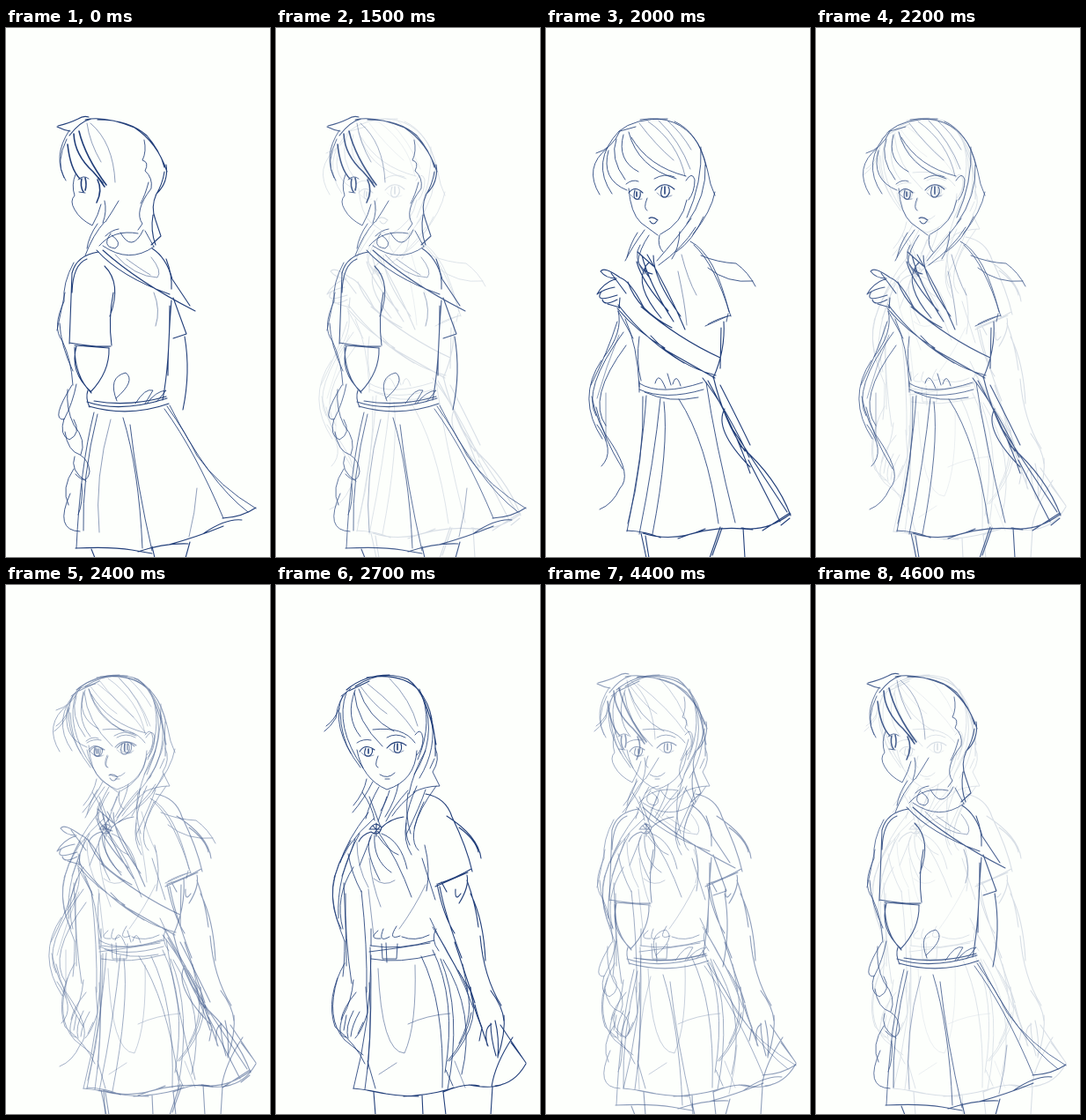
An HTML page that plays this animation: 300x600 px, repeating every 4.7 s.

```html
<!DOCTYPE html>
<html lang="en">
<head>
<meta charset="utf-8">
<title>Turning girl sketch</title>
<style>
html, body { margin: 0; width: 100%; height: 100%; overflow: hidden; background: #fdfffc; }
svg { display: block; width: 300px; height: 600px; fill: none; stroke: #223f7a; stroke-linecap: round; stroke-linejoin: round; }
.fine { stroke-width: .5; }
.pen { stroke-width: .85; }
.firm { stroke-width: 1.1; }
.bold { stroke-width: 1.6; }
.pose { animation: 4700ms linear infinite; }
#back { animation-name: back; }
#side { animation-name: side; opacity: 0; }
#front { animation-name: front; opacity: 0; }
/* every cross-fade passes through five mixes, 1/6 to 5/6 */
@keyframes back {
  0% { opacity: 1; }
  31.9148% { opacity: 1; animation-timing-function: steps(5, jump-both); }
  42.5531% { opacity: 0; }
  89.3617% { opacity: 0; animation-timing-function: steps(5, jump-both); }
  100% { opacity: 1; }
}
@keyframes side {
  0% { opacity: 0; }
  31.9148% { opacity: 0; animation-timing-function: steps(5, jump-both); }
  42.5531% { opacity: 1; }
  46.8085% { opacity: 1; animation-timing-function: steps(5, jump-both); }
  57.4468% { opacity: 0; }
  100% { opacity: 0; }
}
@keyframes front {
  0% { opacity: 0; }
  46.8085% { opacity: 0; animation-timing-function: steps(5, jump-both); }
  57.4468% { opacity: 1; }
  89.3617% { opacity: 1; animation-timing-function: steps(5, jump-both); }
  100% { opacity: 0; }
}
</style>
</head>
<body>
<svg viewBox="0 0 300 600">
<g id="back" class="pose">
  <!-- hair -->
  <path class="firm" d="M58,112Q66,116 73,117M59,111Q72,108 82,103Q88,99 94,101M97,103Q84,106 72,122M90,104Q112,99 146,113Q172,130 183,163M104,104Q140,104 160,122Q175,139 180,158"/>
  <path class="firm" d="M182,155Q185,175 171,188Q164,203 170,218L176,236L165,246M180,163Q178,177 170,190M167,212Q164,230 170,246"/>
  <path class="pen" d="M72,116Q52,146 68,173M69,126Q56,152 66,170M157,127Q160,140 155,150Q163,152 158,162Q167,170 165,182Q145,208 155,222L150,229M162,175Q158,190 153,199M112,196Q115,208 110,221M128,196Q121,208 113,220"/>
  <path class="bold" d="M77,120Q78,144 99,163L110,176M83,117Q90,146 114,178M70,132Q73,160 84,171"/>
  <path class="fine" d="M96,108Q122,130 124,175M92,108Q95,130 108,152"/>
  <!-- face -->
  <path class="pen" d="M79,166Q74,178 78,190Q72,196 78,206Q84,217 98,224Q105,212 108,200M82,172Q88,166 94,171M83,186L90,187"/>
  <path class="bold" d="M86,171Q84,180 88,186M90,170Q92,178 90,184M104,172Q110,184 103,198M105,170L112,180"/>
  <!-- neck and collar -->
  <path class="pen" d="M112,220Q99,234 90,258M104,222Q94,236 92,250M113,236Q120,229 128,228M106,247Q122,228 150,233M119,233Q108,248 124,250Q133,244 120,235M110,247Q140,268 168,248M130,232Q143,256 156,229M158,230L168,248"/>
  <path class="firm" d="M103,252Q130,282 186,302M110,252Q150,288 215,321M166,250Q182,260 189,285L209,315"/>
  <path class="fine" d="M124,257Q146,282 172,283Q178,276 165,260M137,262Q152,273 164,280M168,300Q176,320 170,338"/>
  <!-- sleeve and arm -->
  <path class="firm" d="M105,254Q80,258 75,278L72,358M92,262Q76,268 75,300M72,357Q98,362 119,361M78,360L117,363M122,300Q116,330 120,360M112,270Q132,290 118,327"/>
  <path class="firm" d="M80,361Q72,390 96,412M78,362Q78,395 97,414M117,363Q118,390 96,413"/>
  <!-- braid -->
  <path class="pen" d="M77,266Q64,290 66,310Q52,340 64,355Q74,375 76,405M61,335Q62,360 76,389M67,300L58,343M75,405Q50,445 66,444Q76,425 80,404M66,443Q60,462 72,467Q86,460 77,444"/>
  <path class="pen" d="M70,410Q68,432 77,450Q92,468 85,484M67,458Q70,480 84,484Q94,490 95,503Q92,520 79,506M78,486Q72,502 91,514M77,500Q62,522 71,541M86,517Q88,538 82,552M73,528Q54,570 84,571"/>
  <!-- body -->
  <path class="firm" d="M188,309Q184,360 184,394M186,315Q186,380 178,422M190,306L205,347L190,352M203,350Q210,390 201,433M182,262Q189,280 188,296"/>
  <path class="pen" d="M126,423Q115,396 136,391Q148,400 125,420M147,426Q158,408 167,411L158,426M160,426Q170,412 182,411L171,424"/>
  <path class="firm" d="M92,424Q130,437 183,420M94,429Q140,442 185,426M100,423Q140,430 182,418M93,411Q90,420 95,430"/>
  <!-- skirt and legs -->
  <path class="pen" d="M100,436Q84,500 80,590M104,438Q86,510 88,570M133,442Q151,500 155,590M141,450Q149,520 166,593M183,429Q206,462 217,485Q242,520 284,545M180,432Q215,480 247,556M186,428Q230,515 275,549"/>
  <path class="firm" d="M79,590Q120,588 143,592L166,596M150,594Q180,584 207,585M185,586Q215,578 247,565M225,573Q250,556 268,558M246,556Q268,555 284,544"/>
  <path class="fine" d="M119,444Q100,510 106,572M217,522Q215,550 208,577"/>
  <path class="firm" d="M97,591L101,601M166,588L169,601M209,583L204,601"/>
</g>

<g id="side" class="pose">
  <!-- hair -->
  <path class="pen" d="M83,117Q100,102 138,103M107,104Q150,97 172,130Q180,142 187,177L192,190M146,106Q173,118 182,157M192,186Q188,208 167,234M176,135Q178,175 160,215M181,155Q183,190 160,222"/>
  <path class="pen" d="M102,112L84,117Q75,137 57,142M70,136Q42,158 61,189M83,117Q50,152 75,188M71,139Q62,172 92,184M80,126Q72,148 90,172"/>
  <path class="pen" d="M88,121Q80,150 105,163M94,118Q104,158 148,171M97,124Q116,157 159,168"/>
  <path class="fine" d="M116,106Q150,130 158,168M128,105Q152,128 164,160M106,108Q124,132 145,150M139,106Q154,119 165,138"/>
  <!-- face -->
  <path class="pen" d="M94,182Q96,210 108,221L127,235M130,234Q155,222 160,195M159,173Q166,162 169,172Q169,186 162,195M115,193Q110,205 115,207M91,177Q98,171 105,174M123,171Q135,164 146,169"/>
  <path class="firm" d="M94,187Q101,178 110,187M124,184Q134,172 146,183M101,184Q98,196 105,194Q108,191 107,186M132,180Q128,193 136,192Q143,187 139,180M117,216Q121,213 127,218M118,219Q122,225 126,219"/>
  <path class="bold" d="M103,186V191M135,180V188"/>
  <path class="fine" d="M96,189Q101,196 109,194M126,187Q133,195 143,190"/>
  <!-- falling hair and collar -->
  <path class="pen" d="M129,235Q126,247 133,254M104,232Q96,244 92,260M112,229Q98,248 90,264M117,235Q106,251 104,267M165,216Q149,238 126,264M170,226Q155,250 128,269M179,214Q167,241 148,254M152,231Q151,250 143,262"/>
  <path class="pen" d="M164,242Q192,256 208,322M168,246Q192,268 210,327M176,258Q195,266 216,267Q230,277 238,293M184,272Q206,290 235,287M107,246Q98,259 112,279"/>
  <path class="firm" d="M103,265Q110,290 139,321M109,258Q117,290 145,333M115,257Q138,295 158,342M122,258Q122,285 153,327M113,271Q100,292 131,329M106,268L119,285M117,266Q106,276 121,279M104,254L122,270"/>
  <path class="fine" d="M154,257Q161,285 171,303M150,276Q158,312 160,337"/>
  <!-- raised hand and arm -->
  <path class="firm" d="M62,276Q66,270 84,283Q96,287 111,317M62,276Q68,284 80,284Q64,290 58,302Q66,296 78,294M63,299Q54,312 81,303M64,308Q66,316 81,308M70,313L84,317M74,278L91,301M84,306L83,318"/>
  <path class="firm" d="M81,318Q104,345 135,363M82,314Q115,356 157,380M119,349Q150,383 193,394M93,288Q104,320 143,340M108,316Q150,352 198,374M130,362L192,397M202,333Q204,366 190,397M199,340L198,386"/>
  <path class="pen" d="M210,326Q196,329 184,336M206,327L181,338M207,324L205,333"/>
  <!-- long hair -->
  <path class="pen" d="M82,321Q88,345 66,373M81,333Q70,368 51,405M88,345Q40,410 57,440M63,377Q34,420 64,466M91,360Q46,420 68,451M57,430Q64,463 87,500"/>
  <path class="pen" d="M52,418Q58,450 75,472Q98,508 84,522Q76,540 61,546M58,450Q80,480 63,497"/>
  <path class="fine" d="M83,348Q68,385 58,420M68,414V468"/>
  <!-- waist -->
  <path class="pen" d="M90,330Q104,360 106,407M82,321L99,352M106,350Q102,378 108,400M106,403Q130,418 178,402M106,410Q135,423 179,410M112,413Q140,426 173,419M106,401V413M136,409Q128,388 124,403M142,405L138,392M153,406Q148,390 144,404"/>
  <!-- skirt and legs -->
  <path class="pen" d="M114,417Q110,480 92,571M110,418Q112,490 93,562M130,420Q123,490 106,574M134,424Q140,475 121,574M151,421Q183,470 196,562M182,402Q192,470 215,561"/>
  <path class="firm" d="M178,397Q204,430 231,487M190,395Q202,446 226,480M184,400Q215,455 232,505M198,405Q220,448 232,473M203,432Q190,455 232,498M212,455Q235,490 274,549M221,474Q262,510 278,553M230,490L266,560"/>
  <path class="firm" d="M92,570Q114,571 130,578M110,573Q145,584 181,568M150,579Q190,563 235,569M222,567Q250,572 278,551M246,570L277,550M267,564L277,556"/>
  <path class="firm" d="M108,573L114,601M113,576L117,601M198,566L186,601M200,567L189,598M224,567L226,601"/>
</g>

<g id="front" class="pose">
  <!-- hair -->
  <path class="firm" d="M80,119Q100,102 129,102M90,115Q120,95 150,107Q172,122 182,181M103,105Q143,99 162,119Q174,134 177,152M176,150Q182,172 181,194M83,120L106,109"/>
  <path class="pen" d="M85,117Q70,128 68,151Q62,161 55,166M74,126L82,120M72,140Q66,154 57,160M76,125Q60,160 96,207M73,145Q74,172 85,191M80,122Q66,160 99,208M90,119Q78,150 96,172"/>
  <path class="pen" d="M89,122Q92,155 121,183M94,118Q104,150 134,166M110,164Q145,160 158,179"/>
  <path class="fine" d="M104,112Q140,140 158,167M129,106Q153,130 161,160M96,115Q111,136 126,146"/>
  <path class="pen" d="M163,118Q180,155 161,198M168,130Q183,175 157,215M176,148Q184,185 163,219M181,185Q187,198 178,212L186,228Q170,228 156,235M180,197L175,208M170,188Q156,212 151,237"/>
  <!-- face -->
  <path class="pen" d="M92,187Q98,220 126,232Q158,222 160,188M158,170Q165,160 167,174Q167,186 160,193M116,194Q111,206 116,207M118,215Q127,221 135,213M124,220H129M92,179Q99,174 108,176M126,173Q136,167 147,173"/>
  <path class="firm" d="M95,189Q101,179 112,187M126,185Q136,173 148,182M102,185Q98,195 106,194Q111,191 109,185M135,180Q132,192 140,190Q144,187 142,180"/>
  <path class="bold" d="M105,186V191M138,180V187"/>
  <path class="fine" d="M97,190Q102,197 111,193M129,186Q136,194 145,188"/>
  <!-- neck, collar, knot -->
  <path class="pen" d="M129,233Q125,247 119,256M139,226Q136,244 124,263M126,240L116,268M103,220Q100,236 88,250M110,223Q100,243 87,258M117,229Q106,248 102,265M98,235Q110,252 112,267M106,240L118,272M150,233Q134,250 125,268M158,235Q140,249 132,262"/>
  <path class="firm" d="M107,276Q113,267 120,275Q117,286 108,280M110,273L118,282M111,282L119,273M106,277H118M114,270V285M120,275Q130,265 145,263M108,280Q98,283 94,291"/>
  <path class="pen" d="M109,283Q98,297 118,335M112,284Q110,312 131,326M118,283Q138,310 154,354M120,282Q142,290 149,322M116,285Q128,302 139,306M108,286L95,318"/>
  <!-- shoulder and sleeve -->
  <path class="firm" d="M170,237Q193,241 200,263Q217,298 223,325M194,262Q230,285 233,310M208,275Q227,289 230,303M222,322Q205,332 184,339M218,326L181,342M204,345Q203,360 210,350M217,329Q220,342 208,361M188,337L194,348"/>
  <path class="pen" d="M150,236Q146,260 153,282M170,232Q164,250 148,283M160,228Q140,272 152,295M182,228Q162,255 157,276M148,270Q144,290 154,306M168,246Q148,288 162,301M169,295Q176,322 171,347M166,310L181,357"/>
  <!-- left hair -->
  <path class="pen" d="M105,258Q80,290 73,315M111,265Q76,295 66,332M85,290Q50,345 74,390M67,330Q58,355 78,404M90,288Q82,312 75,330M95,282Q68,330 71,378M88,320Q66,354 76,390"/>
  <path class="pen" d="M78,404Q78,428 76,444M78,429Q56,468 67,501Q92,522 101,543M70,446Q56,492 78,516L99,533"/>
  <path class="fine" d="M92,292Q92,320 105,343M106,310Q109,340 119,365M111,333Q123,343 135,335M105,345L111,398M170,340Q157,367 140,390"/>
  <!-- left arm and hand -->
  <path class="pen" d="M79,350Q78,400 86,452M77,338Q80,400 80,432M97,347Q104,410 103,462M82,305Q86,328 97,348M88,448Q86,472 76,489Q68,512 80,513M91,462Q76,480 74,493M102,456L104,485Q98,506 90,514M80,488L77,505M88,483Q78,502 82,514M95,484Q86,500 85,512M99,496L93,509"/>
  <!-- right arm and hand -->
  <path class="firm" d="M186,342Q192,374 211,423M183,339Q190,375 203,395M203,405L226,474M217,335Q227,362 230,388M221,350Q236,380 238,426M232,398Q236,445 256,477M244,460Q258,479 259,494M221,456Q222,475 234,502"/>
  <path class="firm" d="M226,476Q230,493 241,523M244,497Q244,514 250,534M249,494Q254,514 252,536M240,522Q236,502 245,498M252,535Q261,508 259,488M234,502L231,517"/>
  <!-- waist -->
  <path class="pen" d="M107,409Q140,415 180,403M106,416Q140,412 175,406M108,424Q140,430 181,419M120,407L121,424H137L138,407M125,406L126,428"/>
  <path class="pen" d="M116,392Q104,402 119,401M122,390Q115,407 129,399M137,387Q126,404 141,398M108,390V409M143,399Q158,405 174,397M182,390Q175,402 185,415"/>
  <!-- skirt and legs -->
  <path class="pen" d="M107,411Q110,480 104,549M108,420Q108,495 88,571M106,451Q110,515 101,572M104,540L113,571M165,421Q192,475 189,570M178,414Q206,470 192,553M187,424Q212,485 195,572M190,425Q228,485 211,555M193,550L201,568"/>
  <path class="fine" d="M116,435Q120,530 146,531Q160,500 158,431M150,498Q171,488 198,486M117,555L137,542M203,540L215,570"/>
  <path class="firm" d="M88,571Q108,573 125,577M103,573Q135,580 162,580M145,580Q180,578 202,570M190,575Q215,564 231,568M219,567Q246,572 258,566M245,569Q249,543 269,513M255,499Q267,517 284,542M249,568Q271,566 284,543M267,519L282,539"/>
  <path class="pen" d="M175,378Q192,416 221,460M178,388Q206,430 224,479M207,437Q232,475 208,520M216,451Q240,490 197,540M212,430L218,461M222,485Q217,515 195,540"/>
  <path class="firm" d="M111,575L113,601M166,579L167,601M190,575L193,601M246,569L244,601"/>
</g>
</svg>
</body>
</html>
```
